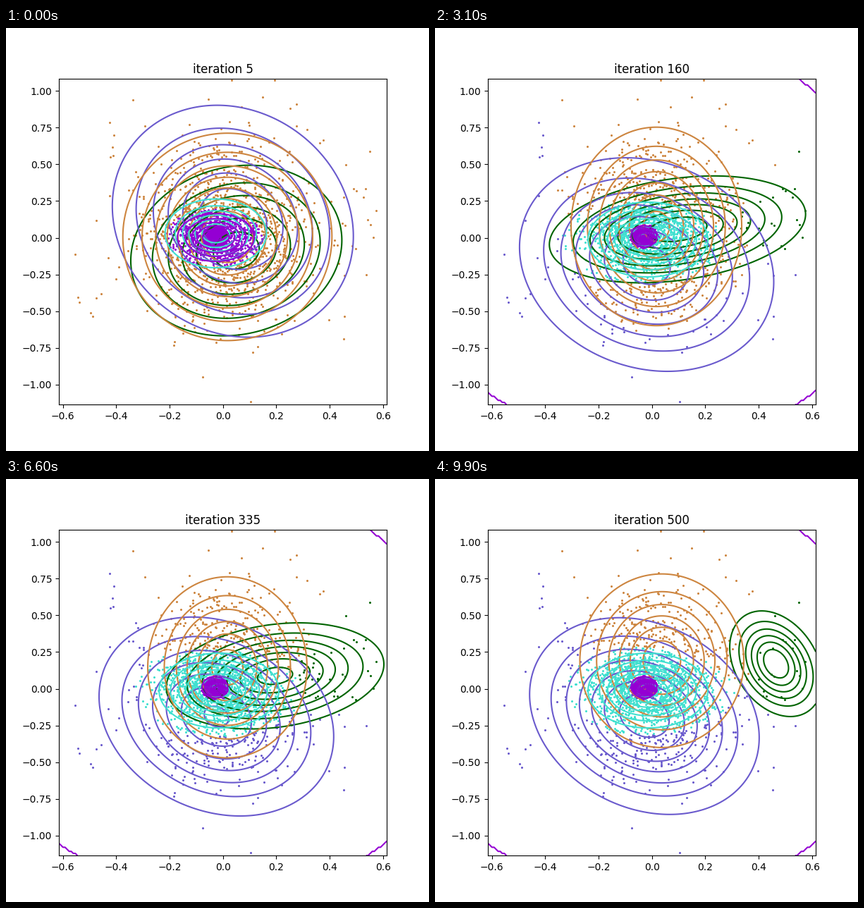
Recreate the animation shown at these times as a matplotlib script. Size 600 by 600 pixels, loop 10 s.

```python
import numpy as np
import matplotlib.pyplot as plt
from matplotlib.animation import FuncAnimation

FRAMES, STEP = 100, 5
XLIM, YLIM = (-0.6152, 0.6138), (-1.1358, 1.0833)

# Each Gaussian: key iteration -> mean x, mean y, sd x, sd y, correlation, weight
PARTS = {
    "darkgreen": {
        5: (.050, -.087, .204, .2996, .12, .04),
        75: (.0634, .047, .2414, .179, .31, .045),
        235: (.124, .066, .233, .180, .26, .035),
        385: (.231, .0985, .1895, .181, .20, .02),
        500: (.4652, .1705, .0883, .183, -.31, .01),
    },
    "slateblue": {
        5: (.037, .1126, .229, .4005, -.13, .05),
        75: (-.0172, -.173, .249, .379, -.133, .05),
        235: (-.0225, -.191, .227, .3476, -.19, .10),
        500: (-.0284, -.186, .213, .3317, -.22, .12),
    },
    "peru": {
        5: (.0165, .006, .1925, .347, 0, .40),
        75: (.0165, .044, .163, .348, 0, .25),
        385: (.0165, .1657, .153, .314, 0, .11),
        500: (.037, .191, .158, .304, 0, .10),
    },
    "turquoise": {
        5: (-.027, .030, .0965, .119, 0, .06),
        75: (-.015, -.012, .112, .127, 0, .38),
    },
    "darkviolet": {
        5: (-.027, .002, .075, .085, 0, .45),
        75: (-.030, .010, .024, .0364, -.036, .30),
    },
}


def disc(rng, n, inner, outer, power):
    """Points between two radii, denser inside for larger powers."""
    r = inner + (outer - inner) * rng.random(n) ** power
    a = rng.uniform(0, 2 * np.pi, n)
    return np.c_[r * np.cos(a), r * np.sin(a)]


def make_points():
    rng = np.random.default_rng(4)
    core = disc(rng, 1400, 0, 1, .5) * (.048, .072) + (-.029, .010)
    mid = rng.normal((-.02, 0), (.095, .105), (750, 2))
    wide = rng.normal((.005, -.01), (.15, .31), (1150, 2))
    wide = wide[np.hypot(wide[:, 0] / .37, wide[:, 1] / .76) < 1]
    halo = disc(rng, 65, 1, 1.6, 1.3) * (.37, .74)
    right = rng.normal((.465, .17), (.06, .14), (18, 2))
    return np.r_[core, mid, wide, halo, right].T


def state(keys, it):
    times = list(keys)
    first, second = times[:2]
    if it < second:  # the fit moves fastest at the start
        u = (it - first) / (second - first)
        it = first + (second - first) * (1 - (1 - u) ** 2)
    return [np.interp(it, times, col) for col in zip(*keys.values())]


def density(x, y, mx, my, sx, sy, rho):
    u, v, q = (x - mx) / sx, (y - my) / sy, 1 - rho ** 2
    peak = 1 / (2 * np.pi * sx * sy * np.sqrt(q))
    return peak * np.exp(-(u * u - 2 * rho * u * v + v * v) / (2 * q))


px, py = make_points()
gx, gy = np.meshgrid(np.linspace(*XLIM, 160), np.linspace(*YLIM, 160))

fig, ax = plt.subplots(figsize=(6, 6), dpi=100)
ax.set(xlim=XLIM, ylim=YLIM)
title = ax.set_title("")
dots = [ax.plot([], [], "o", ms=2.2, mew=0, color=c, zorder=1)[0] for c in PARTS]
rings = []


def update(i):
    it = STEP * (i + 1)
    title.set_text(f"iteration {it}")
    while rings:
        rings.pop().remove()
    scores = []
    for color, keys in PARTS.items():
        *shape, weight = state(keys, it)
        scores.append(weight * density(px, py, *shape))
        rings.append(ax.contour(gx, gy, density(gx, gy, *shape), colors=color))
    owner = np.argmax(scores, axis=0)
    for k, d in enumerate(dots):
        d.set_data(px[owner == k], py[owner == k])
    ax.set(xlim=XLIM, ylim=YLIM)
    return [title, *dots, *rings]


anim = FuncAnimation(fig, update, frames=FRAMES, init_func=lambda: update(0),
                     interval=100, repeat=True, repeat_delay=0, blit=False)
plt.show()
```
